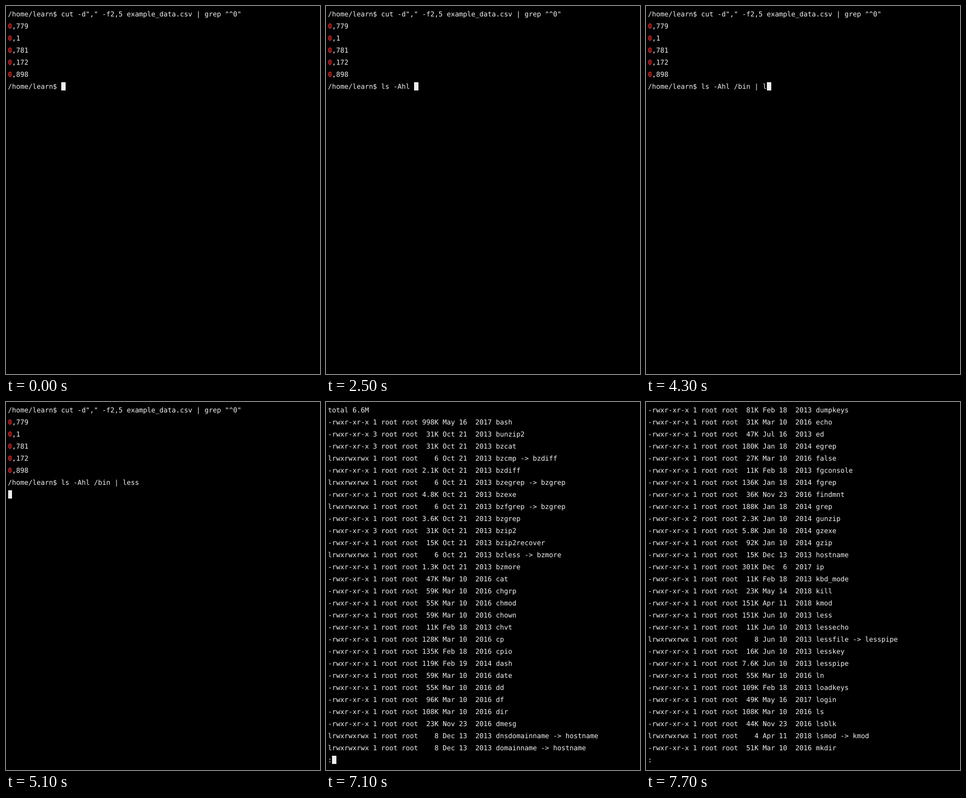
An HTML page that plays this animation: 574x671 px, repeating every 8000 ms.

```html
<!DOCTYPE html>
<html lang="en">
<head>
<meta charset="utf-8">
<title>Terminal session</title>
<style>
  html, body { margin: 0; width: 100%; height: 100%; overflow: hidden; background: #000; }
  #term {
    position: relative; width: 574px; height: 671px; overflow: hidden; color: #f2f2f2;
    font: 12.457px "DejaVu Sans Mono", "Noto Sans Mono", monospace;
    text-rendering: geometricPrecision; font-variant-ligatures: none;
  }
  .row { position: absolute; left: 3.5px; height: 15px; line-height: 15px; white-space: pre; }
  b { color: #e02b2b; }
  #cursor { position: absolute; height: 15px; background: #eee; }
</style>
</head>
<body>
<div id="term"></div>
<script>
const LOOP = 8000, CELL = 7.5, LEFT = 3.5, TOP = 7, PITCH = 22, ROWS = 30;
const PROMPT = '/home/learn$ ';
const COMMAND = 'ls -Ahl /bin | less';

const history = [
  PROMPT + 'cut -d"," -f2,5 example_data.csv | grep "^0"',
  '0,779', '0,1', '0,781', '0,172', '0,898'
];

// links, size, month, day, year, name
const page1 = ['total 6.6M', ...listing(`
1 998K May 16 2017 bash
3 31K Oct 21 2013 bunzip2
3 31K Oct 21 2013 bzcat
1 6 Oct 21 2013 bzcmp -> bzdiff
1 2.1K Oct 21 2013 bzdiff
1 6 Oct 21 2013 bzegrep -> bzgrep
1 4.8K Oct 21 2013 bzexe
1 6 Oct 21 2013 bzfgrep -> bzgrep
1 3.6K Oct 21 2013 bzgrep
3 31K Oct 21 2013 bzip2
1 15K Oct 21 2013 bzip2recover
1 6 Oct 21 2013 bzless -> bzmore
1 1.3K Oct 21 2013 bzmore
1 47K Mar 10 2016 cat
1 59K Mar 10 2016 chgrp
1 55K Mar 10 2016 chmod
1 59K Mar 10 2016 chown
1 11K Feb 18 2013 chvt
1 128K Mar 10 2016 cp
1 135K Feb 18 2016 cpio
1 119K Feb 19 2014 dash
1 59K Mar 10 2016 date
1 55K Mar 10 2016 dd
1 96K Mar 10 2016 df
1 108K Mar 10 2016 dir
1 23K Nov 23 2016 dmesg
1 8 Dec 13 2013 dnsdomainname -> hostname
1 8 Dec 13 2013 domainname -> hostname`), ':'];

const page2 = [...listing(`
1 81K Feb 18 2013 dumpkeys
1 31K Mar 10 2016 echo
1 47K Jul 16 2013 ed
1 180K Jan 18 2014 egrep
1 27K Mar 10 2016 false
1 11K Feb 18 2013 fgconsole
1 136K Jan 18 2014 fgrep
1 36K Nov 23 2016 findmnt
1 188K Jan 18 2014 grep
2 2.3K Jan 10 2014 gunzip
1 5.8K Jan 10 2014 gzexe
1 92K Jan 10 2014 gzip
1 15K Dec 13 2013 hostname
1 301K Dec 6 2017 ip
1 11K Feb 18 2013 kbd_mode
1 23K May 14 2018 kill
1 151K Apr 11 2018 kmod
1 151K Jun 10 2013 less
1 11K Jun 10 2013 lessecho
1 8 Jun 10 2013 lessfile -> lesspipe
1 16K Jun 10 2013 lesskey
1 7.6K Jun 10 2013 lesspipe
1 55K Mar 10 2016 ln
1 109K Feb 18 2013 loadkeys
1 49K May 16 2017 login
1 108K Mar 10 2016 ls
1 44K Nov 23 2016 lsblk
1 4 Apr 11 2018 lsmod -> kmod
1 51K Mar 10 2016 mkdir`), ':'];

function listing(text) {
  return text.trim().split('\n').map(line => {
    const [links, size, month, day, year, ...name] = line.split(' ');
    const mode = name.length > 1 ? 'lrwxrwxrwx' : '-rwxr-xr-x';
    return `${mode} ${links} root root ${size.padStart(4)} ${month} ${day.padStart(2)}  ${year} ${name.join(' ')}`;
  });
}

// Keystrokes: time, characters typed so far
const keys = [
  [100, 1], [200, 2], [300, 3], [600, 4], [1100, 5], [1700, 6], [2000, 7],
  [2500, 8], [3100, 9], [3300, 10], [3400, 11], [3500, 12], [3700, 13],
  [4100, 14], [4200, 15], [4300, 16], [4500, 17], [4700, 18], [4900, 19]
];
// Spans in which the cursor is hidden
const hidden = [
  [700, 1700], [2100, 2200], [2600, 2700], [3000, 3100], [4000, 4100],
  [5700, 6100], [6700, 7100], [7700, 8000]
];
const ENTER = 5100, PAGE1 = 5300, PAGE2 = 7500;

const term = document.getElementById('term');
const rows = Array.from({ length: ROWS }, (_, i) => {
  const row = document.createElement('div');
  row.className = 'row';
  row.style.top = TOP + PITCH * i + 'px';
  return term.appendChild(row);
});
const cursor = document.createElement('div');
cursor.id = 'cursor';
term.appendChild(cursor);

function setRow(i, text = '') {
  const row = rows[i];
  if (row.textContent === text) return;
  row.textContent = text;
  if (/^0,/.test(text)) {
    const mark = document.createElement('b');
    mark.textContent = '0';
    row.replaceChildren(mark, text.slice(1));
  }
}

function setCursor(row, col, on) {
  const x0 = Math.round(LEFT + col * CELL);
  const x1 = Math.round(LEFT + (col + 1) * CELL);
  cursor.style.left = x0 + 'px';
  cursor.style.width = x1 - x0 + 'px';
  cursor.style.top = TOP + PITCH * row + 'px';
  cursor.style.visibility = on ? 'visible' : 'hidden';
}

function screenAt(t) {
  if (t >= PAGE2) return page2;
  if (t >= PAGE1) return page1;
  const typed = keys.reduce((n, [at, count]) => t >= at ? count : n, 0);
  const lines = [...history, PROMPT + COMMAND.slice(0, typed)];
  if (t >= ENTER) lines.push('');
  return lines;
}

function draw(now) {
  const t = now % LOOP;
  const lines = screenAt(t);
  rows.forEach((_, i) => setRow(i, lines[i]));
  const last = lines.length - 1;
  setCursor(last, lines[last].length, !hidden.some(([a, b]) => t >= a && t < b));
}

const start = performance.now();
function tick() {
  draw(performance.now() - start);
  requestAnimationFrame(tick);
}
tick();
</script>
</body>
</html>
```
